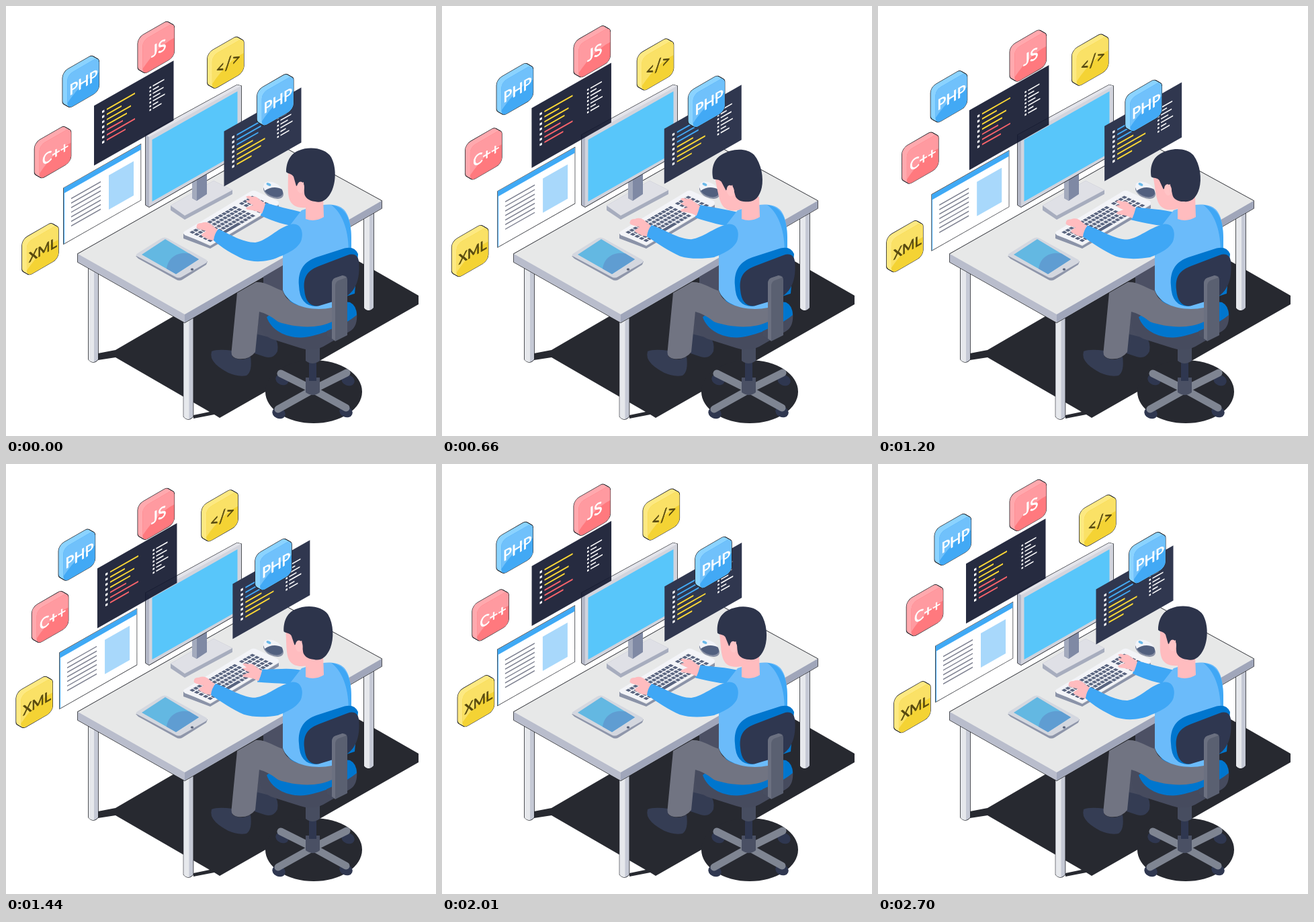
An HTML page with a canvas that plays this animation: 640x640 px, repeating every 2760 ms.

```html
<!DOCTYPE html>
<html lang="en">
<head>
<meta charset="utf-8">
<title>Developer at a desk</title>
<style>
html, body { margin: 0; width: 100%; height: 100%; overflow: hidden; background: #fff; }
canvas { display: block; width: 640px; height: 640px; }
</style>
</head>
<body>
<canvas id="stage" width="640" height="640"></canvas>
<script>
const ctx = document.getElementById('stage').getContext('2d');
const LOOP = 2760, STEP = 30, CYCLE = 2700;
const EDGE = '#25272d', NAVY = '#2f3750', SKIN = '#ffbcbf';
const SLEEVE = '#3fa7f5', SHIRT = '#6bbbfa', SEAT = '#0076ce', FLOOR = '#272930';

// ---------- helpers ----------
function shape(color, d, outline) {
  const p = new Path2D(d);
  if (outline) {
    ctx.strokeStyle = EDGE;
    ctx.lineWidth = 1.6;
    ctx.stroke(p);
  }
  ctx.fillStyle = color;
  ctx.fill(p);
}

function line(color, width, x1, y1, x2, y2) {
  ctx.strokeStyle = color;
  ctx.lineWidth = width;
  ctx.beginPath();
  ctx.moveTo(x1, y1);
  ctx.lineTo(x2, y2);
  ctx.stroke();
}

function ellipse(color, x, y, rx, ry, turn = 0) {
  ctx.fillStyle = color;
  ctx.beginPath();
  ctx.ellipse(x, y, rx, ry, turn, 0, Math.PI * 2);
  ctx.fill();
}

function rect(color, x, y, w, h) {
  ctx.fillStyle = color;
  ctx.fillRect(x, y, w, h);
}

function within(matrix, draw) {
  ctx.save();
  ctx.transform(...matrix);
  draw();
  ctx.restore();
}

const wall = (x, y, draw) => within([1, -0.568, 0, 1, x, y], draw);

// Eased interpolation through [time, value] pairs.
function keyed(time, keys) {
  let i = 1;
  while (i < keys.length - 1 && time > keys[i][0]) i++;
  const [t0, a] = keys[i - 1], [t1, b] = keys[i];
  const k = Math.min(1, (time - t0) / (t1 - t0));
  return a + (b - a) * (1 - Math.cos(Math.PI * k)) / 2;
}

const wave = (angle, degrees) => Math.cos(angle - degrees * Math.PI / 180);

// ---------- floating things ----------
function codeLines(u, v, gap, groups) {
  let row = 0;
  for (const [color, widths] of groups) {
    for (const w of widths) {
      const y = v + gap * row++;
      rect('#fff', u, y - 0.5, 3.4, 3.4);
      rect(color, u + 7, y, w, 2.2);
    }
  }
}

function darkPanel(x, y, w, h, color, alpha, groups, gap) {
  wall(x, y, () => {
    ctx.globalAlpha = alpha;
    rect(color, 0, 0, w, h);
    ctx.globalAlpha = 1;
    codeLines(12, 15, gap, groups);
    [17, 9, 16, 11, 18, 8, 13].forEach((len, i) => {
      const v = 19 + i * 5.6;
      rect('#fff', w - 36, v, 2.6, 2.6);
      rect('#fff', w - 31, v + 0.3, len, 1.8);
    });
  });
}

function whitePanel(x, y) {
  wall(x, y, () => {
    rect(EDGE, -0.8, -0.8, 116, 84.6);
    rect('#fff', 0, 0, 114.5, 83);
    rect('#3fa9f5', 0, 0, 114.5, 8);
    rect('#3fa9f5', 0, 0, 1, 83);
    for (let i = 0; i < 7; i++) rect('#7d8090', 11, 21 + i * 6.8, 44, 1.7);
    rect('#a8d8fb', 67, 19, 37, 51);
  });
}

const PINK = ['#ff797e', '#ff9aa0', '#ffa9ae', '#fff'];
const BLUE = ['#42a9f5', '#70c1fb', '#8bd3ff', '#fff'];
const YELLOW = ['#f4d334', '#fae166', '#fde982', '#57490f'];

function tile(x, y, [base, sheen, rim, ink], label, size) {
  const layer = new Path2D();
  layer.roundRect(0, 0, 47, 51, 8);
  within([1, -0.577, 0, 1, x + 7.3, y + 30.5], () => {
    const sweep = paint => {
      for (let i = 7; i >= 0; i--) {
        ctx.save();
        ctx.translate(-i, -i * 1.15);
        paint();
        ctx.restore();
      }
    };
    ctx.strokeStyle = EDGE;
    ctx.lineWidth = 1.6;
    sweep(() => ctx.stroke(layer));
    ctx.fillStyle = rim;
    sweep(() => ctx.fill(layer));
    ctx.fillStyle = base;
    ctx.fill(layer);
    ctx.save();
    ctx.clip(layer);
    shape(sheen, 'M0 0H47V23C30 22 16 28 0 42Z');
    ctx.restore();
    ctx.font = size + 'px Lato, "Open Sans", sans-serif';
    ctx.textAlign = 'center';
    ctx.textBaseline = 'middle';
    ctx.fillStyle = ctx.strokeStyle = ink;
    ctx.lineWidth = 0.7;
    ctx.fillText(label, 24, 26);
    ctx.strokeText(label, 24, 26);
  });
}

// ---------- furniture ----------
function leg(x, top, bottom) {
  const d = w => `M${x} ${top}h${w}V${bottom - 4}q${-w / 2} 8 ${-w} 0Z`;
  shape('#c5c9d5', d(14), true);
  shape('#e6e8ec', `M${x} ${top}h8V${bottom}q-6 0 -8 -4Z`);
}

function floor() {
  shape(FLOOR, 'M137 517L163 512L455 342L525 380L614 431V444L318 613L310 608L279 614V609L303 604L163 523L137 527Z');
  ellipse(FLOOR, 458, 574, 72, 47);
}

function table() {
  leg(123, 385, 530);
  leg(533, 300, 453);
  leg(264.5, 462, 615);
  shape('#e7e8e8', 'M107 369L400 203L559 290V301L266 471L107 381Z', true);
  shape('#b9bdcc', 'M107 369L266 459V471L107 381Z');
  shape('#a0a6ba', 'M266 459L559 290V301L266 471Z');
}

function monitor() {
  shape('#a7adbe', 'M245 297L309 260L337 274V280L266 318L245 304Z');
  shape('#dfe0e6', 'M245 297L309 260L337 274L266 312Z');
  shape('#7f89a4', 'M277 262L299 250V280L284 290L277 286Z');
  shape('#a3aabd', 'M277 262L284 259V290L277 286Z');
  shape('#d2d4dd', 'M208 192L344 117.5L350 119V220L213 299L208 296Z', true);
  shape('#b4b8c7', 'M208 192L213 195V299L208 296Z');
  shape('#e3e4ea', 'M208 192L344 117.5L350 119L213 195Z');
  shape('#58c6fa', 'M217.5 199L344.5 127V219L217.5 291Z');
}

function keyboard() {
  shape('#8b93a8', 'M264 339L304 357L406 296V301L304 361L264 346Z');
  shape('#f3f4f8', 'M264 338Q264 336 268 334L364 276Q367 274 371 275L404 290Q408 293 404 296L307 354Q304 356 300 354L266 341Z');
  within([103, -60, 40, 18.5, 264, 338], () => {
    for (let row = 0; row < 5; row++) {
      for (let col = 0; col < 18; col++) {
        if (col === 13 || (row === 4 && col > 3 && col < 9)) continue;
        rect('#59647f', 0.05 + col * 0.051, 0.1 + row * 0.165, 0.039, 0.115);
      }
    }
    rect('#59647f', 0.255, 0.76, 0.24, 0.115);
  });
}

function mouse() {
  ellipse('#8890a5', 398, 276, 16, 9.5, 0.45);
  ellipse('#52607f', 397.5, 273.5, 15.5, 9.5, 0.45);
  shape('#f1f3f8', 'M383 270C382 262 390 260 398 262.5C405 265 409 269 411 273C401 268 393 270 385 275Z');
  ellipse('#6bb9e9', 391, 265.5, 3.6, 2, 0.4);
}

function tablet() {
  shape('#8f96aa', 'M193 372L197 376L253 407Q258 410 263 407L298 385L300 380Z');
  shape('#d4d7df', 'M196 368L231 346Q236 343 241 346L297 377Q302 380 297 383L262 403Q257 406 252 403L196 373Q191 371 196 368Z');
  shape('#63b8e2', 'M202 370L237 347L287 377L253 399Z');
  shape('#5f9dd2', 'M239 391C241 375 255 365 273 368.5L287 377L253 399Z');
  ellipse('#596279', 277, 392, 2.2, 1.7);
}

function chairBase() {
  for (const [x, y] of [[411, 556], [509, 557], [406, 606], [506, 604]]) ellipse(NAVY, x, y, 10, 8, 0.4);
  ctx.lineCap = 'round';
  for (const [x, y] of [[409, 547], [507, 546], [405, 600], [506, 598]]) line('#7f8592', 11, 457, 571, x, y);
  ctx.lineCap = 'butt';
  shape('#4a5064', 'M446 553H467V575Q457 583 446 575Z');
  rect(NAVY, 451, 525, 11, 33);
  shape('#474d60', 'M446 500H467V528Q456 536 446 528Z');
}

function seat() {
  shape('#464b5e', 'M378 452C375 478 380 491 400 497L438 509Q456 515 472 507L512 484Q524 477 522 456L430 432Z');
  shape(SEAT, 'M388 463C396 487 428 499 456 491C484 484 506 473 522 460Q522 446 512 441L430 432Z');
}

function backrest() {
  shape(SEAT, 'M436 416C434 392 445 380 462 374L504 360.5Q519 357 524 369L519 428L462 447Q437 447 436 416Z');
  shape(NAVY, 'M444 422C442 402 450 393 466 387L508 371Q522 366 525 379C528 407 520 427 500 436L465 446.5Q446 448 444 422Z');
  shape('#474d60', 'M477 484L488 479V498L478 491Z');
  shape('#5a6071', 'M485 412Q486 405 492 404L501 401Q508 401 508 408V490L490 499L485 495Z');
  shape('#6b7080', 'M485 412Q486 405 492 404L501 401L507 404L496 408Q490 410 490 417V498L485 495Z');
}

// ---------- person ----------
function legs() {
  shape('#4c5064', 'M383 403L412 386V440L383 420Z');
  shape('#474c5f', 'M377 450L396 462L392 492L372 500Z');
  shape('#343c53', 'M372 488L400 495Q406 500 404 514Q398 526 385 522L370 517Z');
  seat();
  shape('#353d54', 'M306 514Q315 510 337 513V522Q350 530 364 522Q367 544 358 550C342 553 325 545 312 533Q303 524 306 514Z');
  shape('#717482', 'M344 427L372 411C386 410 396 418 412 424C420 447 445 452 487 446V469C465 481 430 479 405 470C395 462 385 457 377 455L371 515Q362 527 345 525Q335 523 335.5 515Z');
}

function torso() {
  shape(SHIRT, 'M440 304C462 296 490 290 503 303C515 316 514 340 514 375L485 449C455 455 420 447 412 423V340Z');
  shape(SLEEVE, 'M484 296C505 299 514 316 514 345V362H510C509 332 501 309 484 296Z');
}

function farArm(dx, dy) {
  const wx = 384 + dx, wy = 302 + dy * 0.9;
  shape(SLEEVE, `M${wx + 3} ${wy - 9}C402 ${298 + dy * 0.6} 422 302 444 308L434 328C416 327 400 ${321 + dy * 0.4} ${wx - 5} ${wy + 10}Q${wx - 3} ${wy} ${wx + 3} ${wy - 9}Z`);
  within([1, 0, 0, 1, dx, dy], () =>
    shape(SKIN, 'M357 284Q361 281 366 284Q372 282 376 287L386 294Q384 302 381 309Q374 305 367 304L359 303Q355 300 360 299L368 296Q361 294 357 290L363 289Z'));
}

function nearArm(dx, dy) {
  const wx = 312 + dx, wy = 341 + dy, elbow = dy * 0.8;
  within([1, 0, 0, 1, dx, dy], () =>
    shape(SKIN, 'M284 327Q284 323 291 323Q298 320 304 324L315 333L309 349Q300 348 295 344Q289 342 292 339L298 335L287 332Q282 330 284 327Z'));
  shape(SLEEVE, `M${wx + 4} ${wy - 9}C332 ${339 + dy} 352 ${352 + elbow} 371 ${352 + elbow}C390 ${349 + elbow} 402 331 424 325C438 322 443 335 440 347C437 360 420 368 405 374C390 ${381 + elbow} 369 ${382 + elbow} 354 ${377 + elbow}C338 ${370 + elbow} 320 ${359 + dy} ${wx - 3} ${wy + 8}Q${wx - 2} ${wy - 2} ${wx + 4} ${wy - 9}Z`);
}

function head(tilt) {
  shape(SKIN, 'M446 280L472 284L473 314Q460 322 446 317Z');
  ctx.save();
  ctx.translate(458, 316);
  ctx.rotate(-tilt * Math.PI / 180);
  ctx.translate(-458, -316);
  shape(SKIN, 'M420 243C420 262 419 275 421 285C424 298 435 301 447 300L470 288V250Z');
  shape('#2d344b', 'M417 247C417 234 422 220 436 215C453 208 476 212 484 225C492 240 491 262 485 275C479 288 470 294 460 291C450 290 444 284 444 278L443 262L432 268L428 254C425 249 420 250 417 247Z');
  ellipse('#ffc4c6', 438.5, 270, 5.5, 8.5);
  ctx.restore();
}

// ---------- scene ----------
function drawScene(time) {
  const a = time / CYCLE * Math.PI * 2;
  const drift = (1 - Math.cos(a)) / 2;

  rect('#fff', 0, 0, 640, 640);
  floor();
  table();
  monitor();

  darkPanel(131 + 5 * drift, 148.5 + 7 * drift, 118.5, 89, '#141930', 0.92,
    [['#fdd835', [42, 22, 36, 30]], ['#f9636a', [24, 42, 28]]], 7.6);
  whitePanel(86 - 6 * drift, 271 + 10 * drift);
  keyboard();
  mouse();
  tablet();
  darkPanel(324.5 + 13 * drift, 186.5 - 8 * drift, 115, 82, '#30374f', 1,
    [['#42a9f5', [46, 36, 32]], ['#fdd835', [24, 42, 36, 22]]], 7.3);

  tile(196, 21 + 13 * drift, PINK, 'JS', 23);
  tile(84 - 6 * drift, 72 + 23 * drift, BLUE, 'PHP', 21.5);
  tile(39.7 + 5.8 * wave(a, -64), 182 - 5.3 * wave(a, 26), PINK, 'C++', 21.5);
  const swayX = 6.7 * wave(a, -43), swayY = 6.6 * wave(a, 62);
  tile(18.7 + swayX, 318.2 + swayY, YELLOW, 'XML', 20);
  tile(294.6 + swayX, 40.6 + swayY, YELLOW, '</>', 23);
  tile(371.5 + 5.6 * wave(a, -70), 104 - 5.2 * wave(a, 22), BLUE, 'PHP', 21.5);

  chairBase();
  legs();
  farArm(
    keyed(time, [[0, 0], [390, -4], [960, 0], [1440, -5], [2010, -2], [2430, -4], [2700, 0]]),
    keyed(time, [[0, 0], [390, 6], [960, 0], [1440, 14], [2010, 7], [2430, 6], [2700, 0]]));
  torso();
  nearArm(
    keyed(time, [[0, 0], [360, -4], [2010, -4], [2400, 0], [2700, 0]]),
    keyed(time, [[0, 0], [360, -6], [2010, -5], [2400, 0], [2700, 0]]));
  head(keyed(time, [[0, 0], [560, 12], [960, 12], [1680, 0], [2340, 12], [2700, 0]]));
  backrest();
}

function tick() {
  const t = performance.now() % LOOP;
  drawScene(Math.min(CYCLE, Math.floor(t / STEP) * STEP));
  requestAnimationFrame(tick);
}
tick();
</script>
</body>
</html>
```
